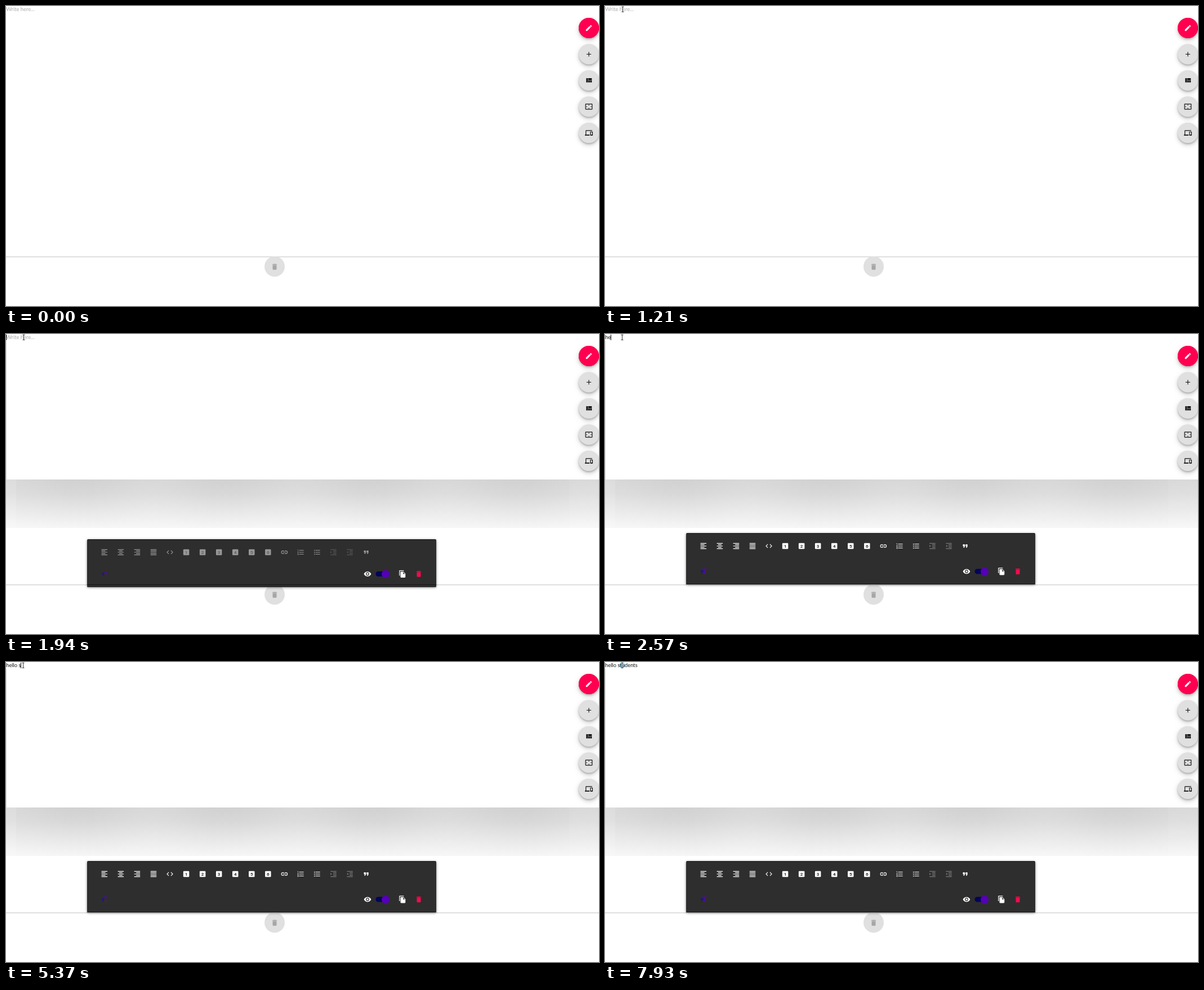
An HTML page with a canvas that plays this animation: 1053 px wide and 532 px high, repeating every 8 s.

```html
<!DOCTYPE html>
<html lang="en">
<head>
<meta charset="utf-8">
<title>Slide editor</title>
<style>
html, body { margin: 0; width: 100%; height: 100%; overflow: hidden; background: #fff; }
canvas { display: block; }
</style>
</head>
<body>
<canvas id="stage" width="1053" height="532"></canvas>
<script>
const ctx = document.getElementById('stage').getContext('2d');
const W = 1053, H = 532, LOOP = 8000;
const ICON_SCALE = 14 / 24;
const FOCUS = 1890, FIRST_KEY = 2220, CLICK = 7930;
const PINK = '#ff0051', GREY = '#e0e0e0', PANEL = '#2e2e2e';

// All icons live on a 24 unit grid.
const bars = widths => widths.map(([x, w], i) => `M${x} ${3 + i * 4}h${w}v2h${-w}z`).join('');
const full = [3, 18];
const aligned = x => bars([full, [x, 12], full, [x, 12], full]);
const indent = arrow => bars([full, [11, 10], [11, 10], [11, 10], full]) + arrow;
const dot = y => `M2.5 ${y}a1.5 1.5 0 1 0 3 0a1.5 1.5 0 1 0-3 0z`;
const listLines = 'M7 5h14v2H7zM7 11h14v2H7zM7 17h14v2H7z';

const ICONS = {
  edit: 'M3 17.25V21h3.75L17.81 9.94l-3.75-3.75zM20.71 7.04c.39-.39.39-1.02 0-1.41l-2.34-2.34c-.39-.39-1.02-.39-1.41 0l-1.83 1.83 3.75 3.75z',
  add: 'M5 11h6V5h2v6h6v2h-6v6h-2v-6H5z',
  quilt: 'M10 18h5v-6h-5zM4 18h5V5H4zM16 18h5v-6h-5zM10 5v6h11V5z',
  overscan: 'M12 5.5L10 8h4zM18 10v4l2.5-2zM6 10l-2.5 2L6 14zM14 16h-4l2 2.5zM21 3H3c-1.1 0-2 .9-2 2v14c0 1.1.9 2 2 2h18c1.1 0 2-.9 2-2V5c0-1.1-.9-2-2-2zm0 16H3V5h18z',
  devices: 'M4 6h18V4H4c-1.1 0-2 .9-2 2v11H0v3h14v-3H4zM23 8h-6c-.55 0-1 .45-1 1v10c0 .55.45 1 1 1h6c.55 0 1-.45 1-1V9c0-.55-.45-1-1-1zm-1 9h-4v-7h4z',
  trash: 'M6 19c0 1.1.9 2 2 2h8c1.1 0 2-.9 2-2V7H6zM19 4h-3.5l-1-1h-5l-1 1H5v2h14z',
  left: aligned(3),
  center: bars([full, [7, 10], full, [7, 10], full]),
  right: aligned(9),
  justify: bars([full, full, full, full, full]),
  code: 'M9.4 16.6L4.8 12l4.6-4.6L8 6l-6 6 6 6zM14.6 16.6l4.6-4.6-4.6-4.6L16 6l6 6-6 6z',
  link: 'M3.9 12c0-1.71 1.39-3.1 3.1-3.1h4V7H7a5 5 0 0 0 0 10h4v-1.9H7c-1.71 0-3.1-1.39-3.1-3.1zM8 13h8v-2H8zM17 7h-4v1.9h4a3.1 3.1 0 0 1 0 6.2h-4V17h4a5 5 0 0 0 0-10z',
  numbers: listLines + 'M2 17h2v.5H3v1h1v.5H2v1h3v-4H2zM3 8h1V4H2v1h1zM2 11h1.8L2 13.1v.9h3v-1H3.2L5 10.9V10H2z',
  bullets: listLines + [6, 12, 18].map(dot).join(''),
  indent: indent('M3 8v8l4-4z'),
  outdent: indent('M7 8v8l-4-4z'),
  quote: 'M6 17h3l2-4V7H5v6h3zM14 17h3l2-4V7h-6v6h3z',
  bigT: 'M9 4v3h5v12h3V7h5V4z',
  smallT: 'M3 12h3v7h3v-7h3V9H3z',
  eye: 'M12 4.5C7 4.5 2.73 7.61 1 12c1.73 4.39 6 7.5 11 7.5s9.27-3.11 11-7.5c-1.73-4.39-6-7.5-11-7.5zM12 17a5 5 0 1 1 0-10a5 5 0 0 1 0 10zM12 9a3 3 0 1 0 0 6a3 3 0 0 0 0-6z',
  copy: 'M16 1H4c-1.1 0-2 .9-2 2v14h2V3h12zM15 5l6 6v10c0 1.1-.9 2-2 2H8c-1.1 0-2-.9-2-2V7c0-1.1.9-2 2-2zm-1 7h5.5L14 6.5z'
};
const paths = Object.fromEntries(Object.entries(ICONS).map(([name, d]) => [name, new Path2D(d)]));

const TOOLS = ['left', 'center', 'right', 'justify', 'code', '1', '2', '3', '4', '5', '6',
  'link', 'numbers', 'bullets', 'indent', 'outdent', 'quote'];
const SIDE = ['edit', 'add', 'quilt', 'overscan', 'devices'];

const PHRASE = 'hello students';
const KEY_TIMES = [2220, 2570, 4640, 4840, 4990, 5230, 5370, 5580, 5790, 5930, 6080, 6220, 6340, 6480];
const CARET_OFF = [[3180, 3780], [4360, 4640], [7070, 7660], [CLICK, LOOP]];

function rect(x, y, w, h, color) {
  ctx.fillStyle = color;
  ctx.fillRect(x, y, w, h);
}

function roundRect(x, y, w, h, r, color) {
  ctx.fillStyle = color;
  ctx.beginPath();
  ctx.roundRect(x, y, w, h, r);
  ctx.fill();
}

function disc(x, y, r, color) {
  ctx.fillStyle = color;
  ctx.beginPath();
  ctx.arc(x, y, r, 0, Math.PI * 2);
  ctx.fill();
}

function shadowed(blur, dy, alpha, draw) {
  ctx.save();
  ctx.shadowColor = `rgba(0,0,0,${alpha})`;
  ctx.shadowBlur = blur;
  ctx.shadowOffsetY = dy;
  draw();
  ctx.restore();
}

function icon(name, x, y, color, scale = ICON_SCALE) {
  ctx.save();
  ctx.translate(x, y);
  ctx.scale(scale, scale);
  ctx.translate(-12, -12);
  ctx.fillStyle = color;
  ctx.fill(paths[name], 'evenodd');
  ctx.restore();
}

function numberIcon(digit, x, y) {
  roundRect(x - 5.25, y - 5.25, 10.5, 10.5, 1.2, '#fff');
  ctx.fillStyle = PANEL;
  ctx.font = 'bold 8px Roboto, sans-serif';
  ctx.textAlign = 'center';
  ctx.fillText(digit, x, y + 2.9);
  ctx.textAlign = 'left';
}

function drawSideButtons() {
  SIDE.forEach((name, i) => {
    const y = 39 + i * 46.5, color = i ? GREY : PINK;
    shadowed(8, 3.5, 0.2, () => disc(1035, y, 18, color));
    shadowed(3, 2, 0.2, () => disc(1035, y, 18, color));
    icon(name, 1035, y, i ? '#111' : '#fff');
  });
}

function drawShadowBand() {
  const top = 258, height = 86;
  const fade = ctx.createLinearGradient(0, top, 0, top + height);
  fade.addColorStop(0, '#d1d1d1');
  fade.addColorStop(0.3, '#d8d8d8');
  fade.addColorStop(1, '#f6f6f6');
  rect(0, top, W, height, fade);

  const ripple = ctx.createLinearGradient(0, 0, W, 0);
  for (let x = 0; x <= W; x += 26) {
    const light = 0.07 * (1 + Math.cos(x / 260 * Math.PI * 2));
    ripple.addColorStop(x / W, `rgba(255,255,255,${light})`);
  }
  rect(0, top, W, height, ripple);
  rect(0, top, 18, height, 'rgba(255,255,255,.12)');
  rect(1000, top, W - 1000, height, 'rgba(255,255,255,.06)');
}

function drawPanel(t) {
  const open = Math.min(2, Math.floor((t - FOCUS) / 50)) / 2;
  const top = 375 - 22 * open, bottom = 453 - 9 * open;
  const topRow = top + 23, bottomRow = bottom - 23;
  shadowed(4, 1, 0.5, () => roundRect(144, top, 620, bottom - top, 2, PANEL));
  rect(145, top, 618, 1, '#151515');
  rect(144, bottom - 1, 620, 1, '#151515');
  if (open < 1) rect(144, 444, 620, 1, '#151515');

  if (open) {
    ctx.globalAlpha = open;
    TOOLS.forEach((name, i) => {
      const x = 174.8 + i * 29.05;
      if (paths[name]) icon(name, x, topRow, name.endsWith('dent') ? '#777' : '#fff');
      else numberIcon(name, x, topRow);
    });
    ctx.globalAlpha = 1;
  }

  const size = ICON_SCALE * (0.86 + 0.14 * open);
  icon('smallT', 174.8, bottomRow, '#22108f', size);
  icon('bigT', 174.8, bottomRow, '#5206b4', size);
  icon('eye', 642, bottomRow, '#fff');
  roundRect(656.5, bottomRow - 4.5, 23, 9, 4.5, '#04045a');
  disc(674, bottomRow + 0.2, 7, '#5400b6');
  icon('copy', 704, bottomRow, '#fff');
  icon('trash', 733, bottomRow, '#f50a4c');
}

function drawText(t) {
  ctx.font = '9.33px Lato, sans-serif';
  if (t < FIRST_KEY) {
    ctx.fillStyle = '#a9a9a9';
    ctx.fillText('Write here...', 0.3, 8.6);
  }
  const typed = PHRASE.slice(0, KEY_TIMES.filter(k => k <= t).length);
  ctx.fillStyle = '#111';
  ctx.fillText(typed, 0.2, 8.8);
  const blinkedOff = CARET_OFF.some(([from, to]) => t >= from && t < to);
  if (t >= FOCUS && !blinkedOff) {
    rect(Math.round(ctx.measureText(typed).width), 1, 1, 10, '#111');
  }
}

function pointerAt(t) {
  if (t >= FIRST_KEY) return [30, 6];
  if (t >= 1000) {
    const p = Math.min(4, Math.floor((t - 1000) / 52)) / 4;
    return [42 - 11 * p, 12 - 6 * p];
  }
  if (t >= 500 && t < 750) {
    const p = Math.floor((t - 500) / 50) / 4;
    return [80 - 10 * p, 39 - 5 * p];
  }
  return null;
}

function drawPointer(t) {
  const pos = pointerAt(t);
  if (!pos) return;
  const x = Math.round(pos[0]), y = Math.round(pos[1]);
  const beam = grow => {
    rect(x - grow, y - 4, 1 + 2 * grow, 9, grow ? 'rgba(255,255,255,.7)' : '#333');
    for (const end of [y - 5, y + 4]) {
      rect(x - 1.5 - grow / 2, end, 4 + grow, 1, grow ? 'rgba(255,255,255,.7)' : '#444');
    }
  };
  beam(1);
  beam(0);
}

function drawClick(t) {
  if (t < CLICK) return;
  const glow = ctx.createRadialGradient(30.5, 6, 1, 30.5, 6, 6);
  glow.addColorStop(0, 'rgba(60,180,235,.9)');
  glow.addColorStop(0.6, 'rgba(80,190,240,.75)');
  glow.addColorStop(1, 'rgba(120,210,250,0)');
  disc(30.5, 6, 6, glow);
}

function draw(t) {
  rect(0, 0, W, H, '#fff');
  rect(0, 444, W, 1.5, '#d6d6d6');
  disc(477, 462, 18, GREY);
  icon('trash', 477, 462.5, '#a6a6a6');
  if (t >= FOCUS) {
    rect(0, 12, 1, 246, '#dcdcdc');
    drawShadowBand();
    drawPanel(t);
  }
  drawSideButtons();
  drawClick(t);
  drawText(t);
  drawPointer(t);
}

const start = performance.now();
function tick() {
  draw((performance.now() - start) % LOOP);
  requestAnimationFrame(tick);
}
tick();
</script>
</body>
</html>
```
